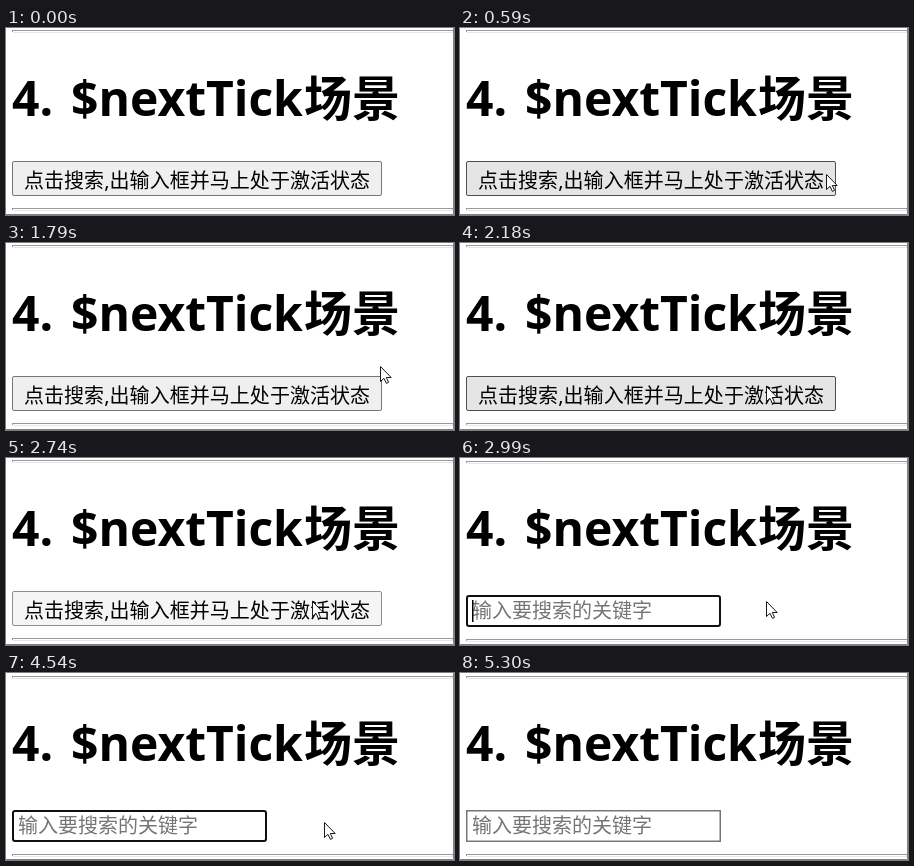
These frames come from a looping animation (448x187 px, 5400 ms). An HTML page:

```html
<!DOCTYPE html>
<html lang="zh">
<head>
<meta charset="utf-8">
<title>$nextTick</title>
<style>
  html, body { margin: 0; width: 100%; height: 100%; overflow: hidden; background: #fff; }
  svg { display: block; width: 448px; height: 187px; }
  text { font: 20px "Noto Sans", "Noto Sans CJK SC", "Noto Sans CJK", sans-serif; white-space: pre; }
  .title { font-size: 48px; font-weight: 700; }
  .label { letter-spacing: .04px; }
  .hint { fill: #757575; }
</style>
</head>
<body>
<svg viewBox="0 0 448 187">
  <defs>
    <g id="hr" shape-rendering="crispEdges">
      <path d="M6 0H447V1H6Z M6 0H7V2H6Z" fill="#9a9a9a"/>
      <path d="M7 2H447V3H7Z M446 1H447V3H446Z" fill="#e6e6e6"/>
    </g>
  </defs>
  <g id="rules">
    <use href="#hr" y="2"/>
    <use href="#hr" y="180"/>
  </g>
  <path d="M0 186.5H447.5V0" fill="none" stroke="#808080"/>
  <text class="title" y="88"><tspan x="6">4.</tspan><tspan x="65">$nextTick</tspan><tspan x="298">场景</tspan></text>
  <g id="button">
    <rect id="face" x="6.5" y="133.5" width="369" height="34" rx="1.5"/>
    <text class="label" x="18" y="159.5">点击搜索,出输入框并马上处于激活状态</text>
  </g>
  <g id="field">
    <rect id="frame" fill="#fff"/>
    <text class="hint" x="12" y="159.5">输入要搜索的关键字</text>
    <rect id="caret" x="12" y="142" width="1.5" height="22"/>
  </g>
  <path id="cursor" d="M.5 .5V15.5L4 12.3L6.4 17.4L8.6 16.4L6.3 11.5H11.2Z" fill="#fff" stroke="#000" stroke-width=".9"/>
</svg>
<script>
const LOOP = 5400;
const OPENED = 2990, BLURRED = 5300;

// Step tables: [start ms, value...]
const cursorSteps = [
  [0, null], [590, 366, 146], [740, 386, 120], [860, 395, 104], [1010, 396, 99],
  [1790, 374, 123], [1940, 352, 136], [2060, 320, 144], [2180, 306, 143],
  [4540, 318, 149], [4660, 348, 164], [4780, 379, 177], [4930, null]
];
const faceSteps = [
  [0, "#efefef", "#767676"], [590, "#e5e5e5", "#4f4f4f"], [740, "#efefef", "#767676"],
  [1940, "#e5e5e5", "#4f4f4f"], [2740, "#f5f5f5", "#8d8d8d"]
];
const caretSteps = [[0, false], [2990, true], [3420, false], [4010, true], [4540, false], [5050, true], [5300, false]];

const $ = id => document.getElementById(id);
const show = (id, on) => $(id).setAttribute("visibility", on ? "visible" : "hidden");
const set = (id, attrs) => {
  for (const key in attrs) $(id).setAttribute(key, attrs[key]);
};
const at = (steps, t) => steps.filter(step => step[0] <= t).pop().slice(1);

function draw(t) {
  const open = t >= OPENED;
  const [fill, stroke] = at(faceSteps, t);
  const [x, y] = at(cursorSteps, t);
  const line = t < BLURRED ? 2 : 1.5;

  $("button").style.display = open ? "none" : "";
  $("field").style.display = open ? "" : "none";
  set("face", { fill, stroke });
  set("frame", {
    x: 6 + line / 2, y: 137 + line / 2, width: 255 - line, height: 32 - line,
    rx: t < BLURRED ? 2 : 0, stroke: t < BLURRED ? "#101010" : "#767676", "stroke-width": line
  });
  set("rules", { transform: `translate(0 ${open ? 1 : 0})` });
  show("caret", at(caretSteps, t)[0]);
  show("cursor", x !== null);
  if (x !== null) set("cursor", { transform: `translate(${x} ${y})` });
}

const start = performance.now();
function tick() {
  draw((performance.now() - start) % LOOP);
  requestAnimationFrame(tick);
}
tick();
</script>
</body>
</html>
```
